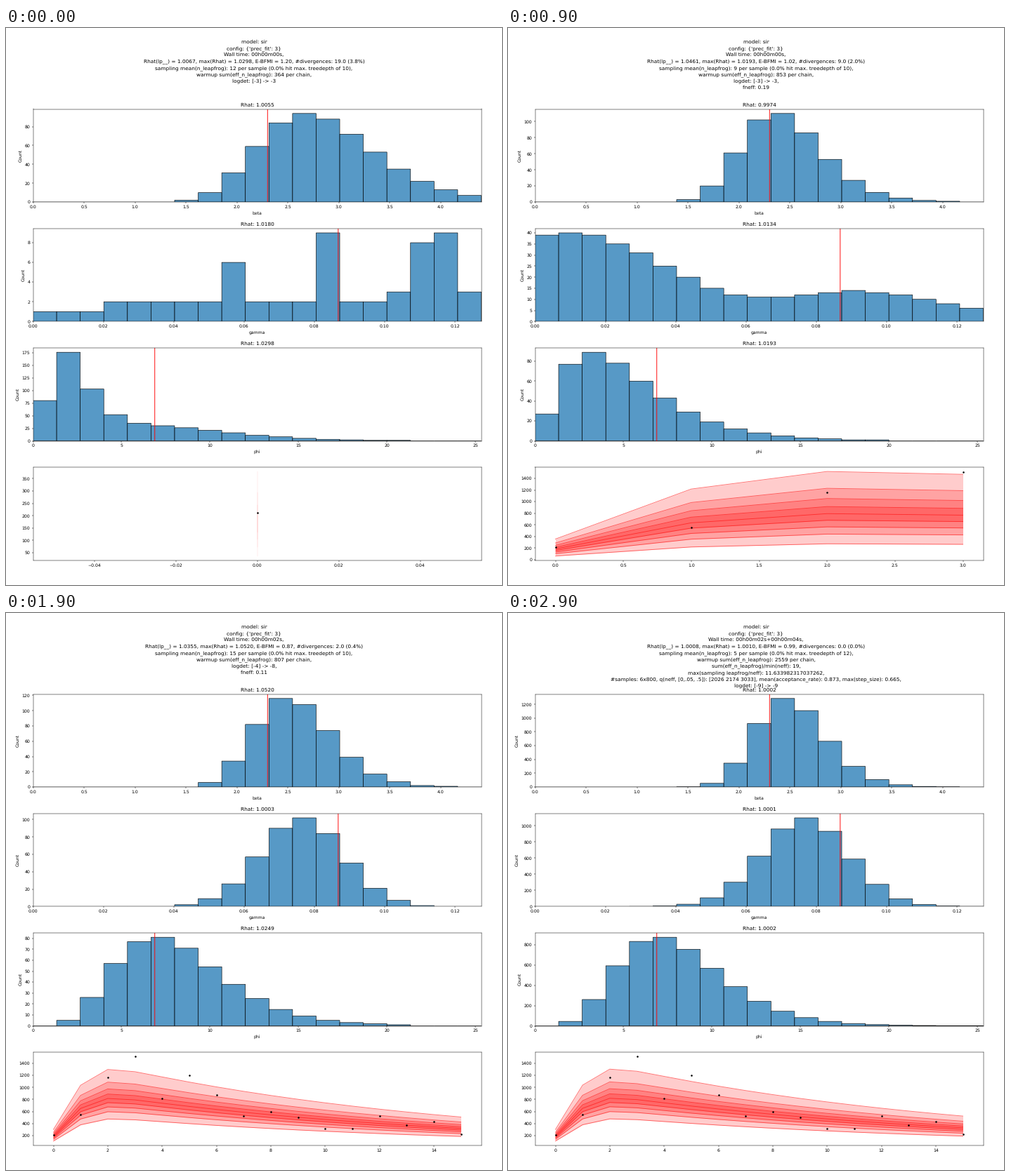
A matplotlib script that plays this animation: 706x794 px, repeating every 3100 ms.

```python
import numpy as np
import matplotlib.pyplot as plt
from matplotlib.animation import FuncAnimation

W, H, DPI = 706, 794, 64
K = W / 16 / DPI          # scales point sizes of a 16 inch wide layout
BINS = 19
LEFT, RIGHT, TOP, HEIGHT, STEP = 38.5, 676.5, 115.5, 132.6, 170.2
HEAD_Y, HEAD_STEP, HEAD_MAX = 21.8, 9.33, 10

plt.rcParams.update({
    "font.family": "DejaVu Sans", "font.size": 10 * K, "text.hinting": "none",
    "axes.titlesize": 12 * K, "axes.titlepad": 6 * K,
    "axes.labelsize": 10 * K, "axes.labelpad": 4 * K,
    "axes.linewidth": 0.8 * K, "patch.linewidth": K,
    "lines.linewidth": 1.5 * K, "lines.markersize": 6 * K,
    "lines.markeredgewidth": K,
})
for side in "xy":
    plt.rcParams.update({
        f"{side}tick.labelsize": 10 * K, f"{side}tick.major.size": 3.5 * K,
        f"{side}tick.major.width": 0.8 * K, f"{side}tick.major.pad": 3.5 * K,
    })

# name, upper limit, true value, skew power (1 is symmetric, near 0 log-normal)
PARAMS = [("beta", 4.4, 2.302, 0.01), ("gamma", 0.1275, 0.0868, 1),
          ("phi", 25.335, 6.88, 1 / 3)]
CASES = [213, 553, 1160, 1512, 820, 1200, 873, 520,
         590, 502, 322, 318, 520, 380, 432, 220]
HALF = np.array([0.286, 0.598, 0.984, 1.645])
LEVELS = np.concatenate([-HALF[::-1], [0], HALF])   # normal scores of the bands


def bump(mode, width, power):
    """Bell over the bins, with its peak at mode, skewed by power."""
    x = np.arange(BINS) + 0.5
    z = mode / width * ((x / mode) ** power - 1) / power
    return np.exp(-z * z / 2)


def hist(power, top, mode, width, *extra):
    """Bin counts with the tallest bar at top; extra bumps are (size, mode, width)."""
    c = bump(mode, width, power)
    for size, m, w in extra:
        c = c + size * bump(m, w, power)
    return np.round(top * c / c.max())


def bands(days, level, decay, spread, bend):
    """Nine quantile curves of an outbreak that rises fast and fades."""
    t = np.arange(days)
    median = level * np.exp(-decay * t) * (1 - 0.81 * np.exp(-t ** 1.47))
    return median * np.exp(spread * LEVELS + bend * LEVELS ** 2)[:, None]


def heading(wall, lp, top, bfmi, div, leap, depth, warmup, *tail):
    return ["model: sir", "config: {'prec_fit': 3}", f"Wall time: {wall},",
            f"Rhat(lp__) = {lp}, max(Rhat) = {top}, E-BFMI = {bfmi}, #divergences: {div}",
            f"sampling mean(n_leapfrog): {leap} per sample (0.0% hit max. treedepth of {depth}),",
            f"warmup sum(eff_n_leapfrog): {warmup} per chain,", *tail]


pages = []


def page(head, rhats, shapes, curve):
    counts = [hist(p[3], *s) for p, s in zip(PARAMS, shapes)]
    pages.append((head, rhats, counts, bands(*curve)))


page(heading("00h00m00s", "1.0067", "1.0298", "1.20", "19.0 (3.8%)",
             12, 10, 364, "logdet: [-3] -> -3"),
     ("1.0055", "1.0180", "1.0298"),
     [(94, 11.6, 2.4),
      (9, 12.5, 0.4, (1.15, 17.1, 0.9), (0.59, 8.5, 0.4), (0.27, 9, 8)),
      (176, 1.3, 0.84, (0.15, 5.5, 2.5))],
     (1, 870, 0, 0.714, -0.127))

page(heading("00h00m00s", "1.0548", "1.0428", "0.90", "16.0 (6.3%)",
             10, 10, 921, "logdet: [-3] -> -3,", "fneff: 0.80"),
     ("1.0032", "1.0180", "1.0428"),
     [(43, 12.7, 2.3),
      (4, 3.5, 1.2, (1, 6.7, 0.6), (1, 10.8, 0.9), (0.5, 14.7, 0.6), (0.25, 18.5, 0.4)),
      (54, 1.8, 1.3, (0.2, 8.5, 3))],
     (2, 960, 0.3, 0.47, -0.08))

page(heading("00h00m00s", "1.0461", "1.0193", "1.02", "9.0 (2.0%)",
             9, 10, 853, "logdet: [-3] -> -3,", "fneff: 0.19"),
     ("0.9974", "1.0134", "1.0193"),
     [(110, 10.2, 1.7), (40, 1.5, 4, (0.33, 14, 3.5)), (89, 2.4, 1.9)],
     (4, 980, 0.08, 0.52, -0.076))

page(heading("00h00m01s", "1.1225", "1.0278", "0.96", "13.0 (4.8%)",
             8, 10, 862, "logdet: [-3] -> -4,", "fneff: 0.51"),
     ("1.0157", "1.0278", "1.0098"),
     [(73, 10.2, 1.41), (31, 3.5, 4.6), (48, 4.3, 2.3)],
     (8, 990, 0.042, 0.36, -0.035))

page(heading("00h00m02s", "1.0355", "1.0520", "0.87", "2.0 (0.4%)",
             15, 10, 807, "logdet: [-4] -> -8,", "fneff: 0.11"),
     ("1.0520", "1.0003", "1.0249"),
     [(116, 10.8, 1.63), (102, 11.4, 1.75), (81, 5.2, 2.25)],
     (16, 1000, 0.076, 0.305, -0.014))

page(heading("00h00m02s", "1.0159", "1.0136", "0.97", "2.0 (0.4%)",
             6, 12, 2017, "logdet: [-8] -> -9,", "fneff: 1.00"),
     ("1.0136", "1.0050", "1.0030"),
     [(138, 10.9, 1.41), (124, 11.5, 1.75), (98, 5.4, 2)],
     (16, 1000, 0.074, 0.305, -0.012))

page(heading("00h00m02s+00h00m04s", "1.0008", "1.0010", "0.99", "0.0 (0.0%)",
             5, 12, 2559,
             "sum(eff_n_leapfrog)/min(neff): 19,",
             "max(sampling leapfrog/neff): 11.633982317037262,",
             "#samples: 6x800, q(neff, [0,.05, .5]): [2026 2174 3033], "
             "mean(acceptance_rate): 0.873, max(step_size): 0.665,",
             "logdet: [-9] -> -9"),
     ("1.0002", "1.0001", "1.0002"),
     [(1285, 10.65, 1.48), (1098, 11.45, 1.83), (875, 5.2, 2.16)],
     (16, 1000, 0.074, 0.305, -0.014))

fig = plt.figure(figsize=(W / DPI, H / DPI), dpi=DPI)
head_lines = [fig.text(0.5, 1 - (HEAD_Y + i * HEAD_STEP) / H, "", fontsize=12 * K,
                       ha="center", va="baseline") for i in range(HEAD_MAX)]
axes = [fig.add_axes([LEFT / W, 1 - (TOP + i * STEP + HEIGHT) / H,
                      (RIGHT - LEFT) / W, HEIGHT / H]) for i in range(4)]


def draw_hist(ax, counts, rhat, name, limit, truth):
    edges = np.linspace(0, limit, BINS + 1)
    ax.bar(edges[:-1], counts, limit / BINS, align="edge", snap=False,
           facecolor=(31 / 255, 119 / 255, 180 / 255, 0.75), edgecolor="black")
    ax.axvline(truth, color="red", snap=False)
    ax.set(xlim=(0, limit), ylim=(0, 1.05 * max(counts)),
           ylabel="Count", title=f"Rhat: {rhat}")
    ax.set_xlabel(name, va="baseline")
    ax.xaxis.set_label_coords(0.5, -17.7 / HEIGHT)


def draw_bands(ax, q):
    n = q.shape[1]
    x = np.arange(n)
    for lo, hi in zip(q[:4], q[:4:-1]):
        if n > 1:
            ax.fill_between(x, lo, hi, color="red", alpha=0.2, lw=0)
        else:
            ax.plot([0, 0], [lo[0], hi[0]], color="red", alpha=0.2, lw=0.6 * K)
    for row in q:
        ax.plot(x, row, color="red", alpha=0.55)
    ax.plot(x, CASES[:n], "k.")


def update(i):
    head, rhats, counts, curves = pages[(i + 4) // 5]
    for k, line in enumerate(head_lines):
        line.set_text(head[k] if k < len(head) else "")
    for ax in axes:
        ax.clear()
    for ax, c, r, p in zip(axes, counts, rhats, PARAMS):
        draw_hist(ax, c, r, *p[:3])
    draw_bands(axes[3], curves)
    return axes


anim = FuncAnimation(fig, update, frames=31, interval=100, repeat=True,
                     repeat_delay=0, blit=False)
plt.show()
```
